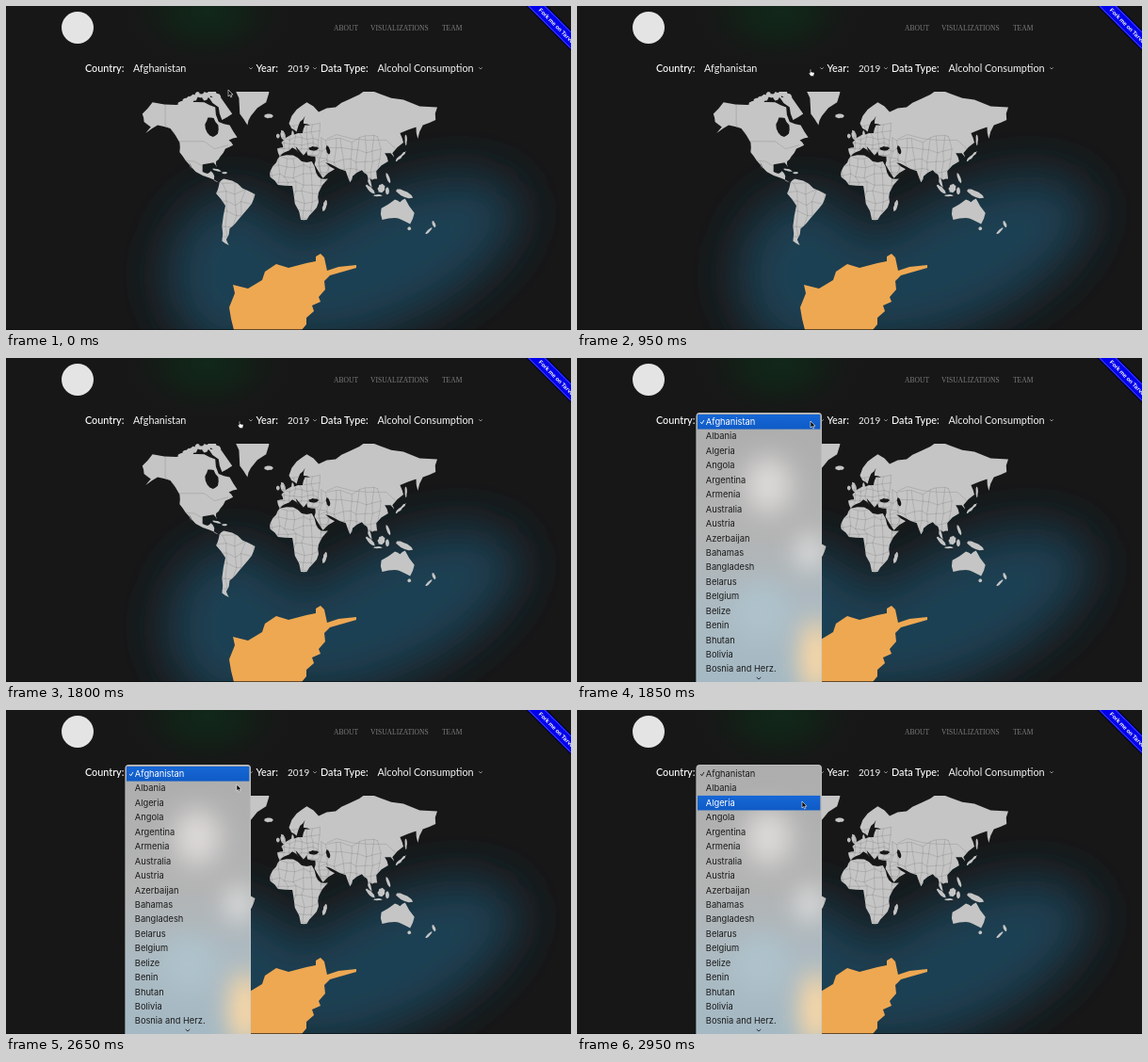
These frames come from a looping animation (600x344 px, 3 s). An HTML page:

```html
<!DOCTYPE html>
<html lang="en">
<head>
<meta charset="utf-8">
<title>World map</title>
<style>
html, body { margin: 0; width: 100%; height: 100%; overflow: hidden; background: #171717; }
svg { display: block; width: 600px; height: 344px; }
.nav { font: 7.55px "Liberation Serif", serif; fill: #7c7c7c; }
.form { font: 10.8px Lato, sans-serif; fill: #f4f4f4; }
.label { font-weight: 500; fill: #fff; }
.menu { font: 9.3px Inter, sans-serif; fill: #1b1b1b; }
.ribbon { font: bold 6px "Liberation Sans", sans-serif; fill: #fff; }
.line { fill: none; stroke-linecap: round; stroke-linejoin: round; }
</style>
</head>
<body>
<svg viewBox="0 0 600 344">
  <defs>
    <filter id="soft" x="-50%" y="-50%" width="200%" height="200%"><feGaussianBlur stdDeviation="26"/></filter>
    <filter id="haze" x="-80%" y="-80%" width="260%" height="260%"><feGaussianBlur stdDeviation="13"/></filter>
    <radialGradient id="green"><stop stop-color="#11281a"/><stop offset=".4" stop-color="#122117"/><stop offset="1" stop-color="#171717" stop-opacity="0"/></radialGradient>
    <linearGradient id="panelFill" x1="0" y1="0" x2="0" y2="1">
      <stop stop-color="#adadad"/><stop offset=".45" stop-color="#b3b4b4"/><stop offset=".72" stop-color="#abbac2"/><stop offset="1" stop-color="#a4b9c4"/>
    </linearGradient>
    <linearGradient id="rowFill" x1="0" y1="0" x2="0" y2="1"><stop stop-color="#1667d6"/><stop offset="1" stop-color="#0f5bc6"/></linearGradient>
    <clipPath id="mapBox"><rect x="134" y="91" width="324" height="165"/></clipPath>
    <clipPath id="panelBox"><rect x="126.5" y="58" width="133.5" height="300" rx="4"/></clipPath>
    <clipPath id="landBox"><path id="landClip"/></clipPath>
  </defs>

  <rect width="600" height="344" fill="#171717"/>
  <ellipse cx="214" cy="6" rx="95" ry="64" fill="url(#green)"/>
  <g fill="#1e4052" filter="url(#soft)">
    <ellipse cx="242" cy="285" rx="72" ry="86"/>
    <ellipse cx="405" cy="270" rx="152" ry="68" transform="rotate(-26 405 270)"/>
  </g>

  <circle cx="76" cy="23" r="17" fill="#e4e4e4"/>
  <g class="nav">
    <text x="348" y="26">ABOUT</text><text x="387" y="26">VISUALIZATIONS</text><text x="463" y="26">TEAM</text>
  </g>
  <g class="form">
    <text class="label" x="84" y="69.5">Country:</text><text x="135" y="69.5">Afghanistan</text>
    <text class="label" x="265.5" y="69.5">Year:</text><text x="299" y="69.5" font-size="10">2019</text>
    <text class="label" x="334" y="69.5">Data Type:</text><text x="394.5" y="69.5">Alcohol Consumption</text>
  </g>
  <path class="line" d="M258.5 65.5l1.5 1.5 1.5-1.5M326.5 65.5l1.5 1.5 1.5-1.5M502.5 65.5l1.5 1.5 1.5-1.5" stroke="#aaa" stroke-width=".8"/>

  <g clip-path="url(#mapBox)">
    <path id="land" fill="#c5c5c5"/>
    <path id="borders" class="line" stroke="#8c8c8c" stroke-width=".4" clip-path="url(#landBox)"/>
    <path id="seas" fill="#171717"/>
  </g>
  <path fill="#eea852" d="M241 296L257 300 272 291 275 282 287 274 300 278 319 273 329 271 329 266 334 263 338 267 341 281 353 277 372 275 372 278 344 286 338 292 339 301 332 309 334 314 325 318 327 324 319 331 319 338 314 344H242L239 332 237 320 243 305Z"/>
  <rect y="343" width="600" height="1" fill="#0b0b0b" opacity=".6"/>

  <path d="M552 0H575L600 25V48Z" fill="#080808"/>
  <path d="M553.5 0H573.5L600 26.5V46.5Z" fill="#0000ec"/>
  <path class="line" d="M555 0L600 45M572 0L600 28" stroke="#b9b9f8" stroke-width=".4" stroke-dasharray=".6 .7"/>
  <text class="ribbon" transform="translate(565.3 4.8) rotate(45)">Fork me on Tarvok</text>

  <g id="panel" clip-path="url(#panelBox)">
    <rect x="126" y="58" width="135" height="290" fill="url(#panelFill)"/>
    <g filter="url(#haze)">
      <ellipse cx="203" cy="135" rx="25" ry="30" fill="#dcd9d7"/>
      <ellipse cx="247" cy="206" rx="13" ry="18" fill="#e4e4e3"/>
      <ellipse cx="254" cy="318" rx="17" ry="40" fill="#ffd9a3"/>
      <ellipse cx="195" cy="270" rx="28" ry="30" fill="#afc3cc"/>
    </g>
    <rect x="126.8" y="58.3" width="132.9" height="300" rx="4" fill="none" stroke="#c9c9c9" stroke-width=".6"/>
    <rect id="highlight" x="128" width="130.3" height="15.6" fill="url(#rowFill)"/>
    <g id="rows" class="menu"></g>
    <path id="check" class="line" d="M131.4 68.3l1.2 1.5 2.1-3.5" stroke-width=".9"/>
    <path class="line" d="M191 339.3l2 1.7 2-1.7" stroke="#222" stroke-width=".9"/>
  </g>

  <g id="cursor" stroke="#fff" stroke-width=".6" stroke-linejoin="round">
    <path id="arrow" fill="#000" d="M0 0V7L1.6 5.5 2.7 8 3.8 7.5 2.8 5.1H5Z"/>
    <path id="hand" fill="#fff" stroke="#000" stroke-width=".5" d="M-.6 .5Q0-.4.6 .5V3L3.6 3.6Q4.3 4 4 5L3.3 7.4H.2L-1.9 4.6Q-1.9 3.6-.6 4.3Z"/>
  </g>
</svg>
<script>
const LOOP = 3000;
const $ = id => document.getElementById(id);

let seed = 7;
const random = () => (seed = seed * 16807 % 2147483647) / 2147483647;
const jitter = size => (random() - 0.5) * 2 * size;

// Mercator projection, 0.9 px per degree at the equator.
const project = ([lon, lat]) => [
  296 + lon * 0.9,
  194.5 - 51.57 * Math.log(Math.tan(Math.PI / 4 + lat * Math.PI / 360))
];
const path = points => "M" + points.map(p => p.map(v => v.toFixed(1)).join(" ")).join("L");

// Break each straight side with one displaced midpoint.
const coast = points => path(points.flatMap(([x, y], i) => {
  const [nx, ny] = points[(i + 1) % points.length];
  const bend = jitter(0.1);
  return [[x, y], [(x + nx) / 2 + (ny - y) * bend, (y + ny) / 2 - (nx - x) * bend]];
})) + "Z";

function parse(text) {
  const n = text.split(" ").map(Number);
  return n.filter((_, i) => i % 2 === 0).map((lon, i) => project([lon, n[2 * i + 1]]));
}

// Tilted ellipse with a broken outline; radii in pixels.
function blob([lon, lat, rx, ry, tilt = 0]) {
  const [x, y] = project([lon, lat]), a = tilt * Math.PI / 180;
  return coast(Array.from({ length: 7 }, (_, i) => {
    const u = rx * Math.cos(i * Math.PI / 3.5), v = ry * Math.sin(i * Math.PI / 3.5);
    return [x + u * Math.cos(a) - v * Math.sin(a), y + u * Math.sin(a) + v * Math.cos(a)];
  }));
}

// Key corners of each landmass: longitude latitude.
const continents = {
  northAmerica: "-168 66 -156 71 -128 70 -95 71 -82 69 -78 62 -65 60 -56 52 -66 50 -61 46 -70 43 -76 36 -81 31 -80 25 -84 30 -97 28 -97 20 -91 18 -87 21 -83 15 -83 10 -78 8 -88 13 -105 20 -113 31 -110 23 -117 32 -124 40 -124 48 -135 58 -150 60 -164 55 -158 59 -166 62",
  southAmerica: "-77 8 -72 12 -62 10 -50 1 -35 -6 -39 -17 -48 -27 -58 -37 -65 -42 -69 -51 -66 -55 -74 -52 -74 -40 -70 -19 -81 -5 -78 3",
  africa: "-6 36 10 37 20 31 32 31 37 19 43 12 51 12 40 -4 40 -15 33 -26 26 -34 19 -34 12 -17 9 4 -8 5 -17 14 -17 21 -10 30",
  eurasia: "26 71 40 67 60 69 75 72 100 76 112 74 140 72 180 69 178 63 163 60 157 51 155 59 136 55 140 48 127 39 129 35 125 39 118 39 122 31 108 21 109 12 103 11 100 14 103 2 98 9 97 17 91 22 80 15 77 8 72 21 57 27 48 30 59 23 45 13 35 28 36 36 27 37 26 41 22 37 13 45 17 39 9 44 0 40 -6 36 -9 43 -2 44 -4 48 8 54 9 57 11 54 21 55 24 60 30 60 22 61 24 65 18 62 14 56 8 58 5 61 14 68",
  australia: "114 -22 130 -12 136 -15 142 -11 153 -27 148 -38 138 -34 130 -32 115 -34",
  greenland: "-62 77 -53 66 -44 60 -40 65 -22 71 -18 77",
  baffin: "-90 73 -76 73 -62 66 -74 63 -78 69"
};

// Longitude, latitude, radii, tilt.
const islands = [
  [-19, 65, 5, 2.5], [-2, 53.5, 2.5, 6, -15], [-8, 53, 2, 2.5], [-80, 22, 5, 1, 15], [-71, 19, 3, 1.2],
  [137, 36, 8, 1.6, -45], [143, 50, 1.2, 6], [47, -19, 2, 6.5, 15], [101, 0, 7, 2, 45], [110, -7.5, 5, 1],
  [114, 1, 4, 5, 25], [121, -2, 2, 4], [122, 13, 1.6, 6, -20], [141, -5.5, 10, 3, 25],
  [147, -42, 2, 2], [176, -38, 1.5, 4, -20], [170, -44, 1.2, 5, 45]
];
const arctic = Array.from({ length: 10 }, (_, i) =>
  [-121 + i * 4.5, 72.5 + jitter(2), 2 + random() * 3, 2 + random() * 3]);
const seas = [[-86, 59, 7, 11, -15], [34, 43.3, 5.5, 2.3], [51, 42, 2, 5, -15]];

// Country lattices: west, east, south, north, columns, rows.
const regions = [
  [-17, 50, -34, 36, 7, 7], [-9, 40, 38, 60, 7, 5],
  [-82, -38, -50, 8, 4, 5], [42, 112, 12, 51, 8, 4]
];

function lattice([west, east, south, north, cols, rows]) {
  const node = Array.from({ length: rows + 1 }, (_, r) => Array.from({ length: cols + 1 }, (_, c) => {
    const dx = (east - west) / cols, dy = (north - south) / rows;
    return project([west + (c + jitter(0.3)) * dx, south + (r + jitter(0.3)) * dy]);
  }));
  const uprights = node.slice(1).flatMap((row, r) => row.map((p, c) => path([p, node[r][c]])));
  return node.map(path).concat(uprights).join("");
}

const landPath = Object.values(continents).map(s => coast(parse(s))).concat(islands.concat(arctic).map(blob)).join("");
$("land").setAttribute("d", landPath);
$("landClip").setAttribute("d", landPath);
$("seas").setAttribute("d", seas.map(blob).join(""));
$("borders").setAttribute("d", regions.map(lattice).join("") +
  ["-141 70 -141 60 -130 55", "-124 49 -95 49 -83 43 -67 46", "-117 32 -106 31 -97 26", "50 51 61 54 80 51 98 50 120 50 131 43"]
    .map(s => path(parse(s))).join(""));

const ROW = 15.44;
const countries = ("Afghanistan,Albania,Algeria,Angola,Argentina,Armenia,Australia,Austria,Azerbaijan," +
  "Bahamas,Bangladesh,Belarus,Belgium,Belize,Benin,Bhutan,Bolivia,Bosnia and Herz.").split(",");
const rows = countries.map((name, i) => {
  const text = document.createElementNS("http://www.w3.org/2000/svg", "text");
  text.setAttribute("x", 136.8);
  text.setAttribute("y", 71 + i * ROW);
  text.textContent = name;
  return $("rows").appendChild(text);
});

// Pointer keys: time, x, y.
const keys = [
  [0, 236, 89], [350, 246, 74], [600, 248, 67], [2300, 248, 67],
  [2650, 245, 79], [2950, 239, 97], [3000, 238, 97]
];

function pointerAt(t) {
  const i = keys.findIndex(k => k[0] > t);
  const [t0, x0, y0] = keys[i - 1], [t1, x1, y1] = keys[i];
  const p = (t - t0) / (t1 - t0);
  return [x0 + (x1 - x0) * p, y0 + (y1 - y0) * p];
}

const show = (id, on) => $(id).setAttribute("visibility", on ? "visible" : "hidden");

function draw(t) {
  const open = t >= 1850;
  const hand = t >= 500 && !open;
  const active = t < 2700 ? 0 : t < 2850 ? 1 : 2;
  const [x, y] = pointerAt(t);
  $("cursor").setAttribute("transform", `translate(${x} ${y})`);
  show("hand", hand);
  show("arrow", !hand);
  $("panel").style.display = open ? "" : "none";
  $("highlight").setAttribute("y", 60 + active * ROW);
  $("check").setAttribute("stroke", active ? "#1b1b1b" : "#fff");
  rows.forEach((row, i) => row.style.fill = i === active ? "#fff" : "");
}

const start = performance.now();
function tick() {
  draw((performance.now() - start) % LOOP);
  requestAnimationFrame(tick);
}
tick();
</script>
</body>
</html>
```
